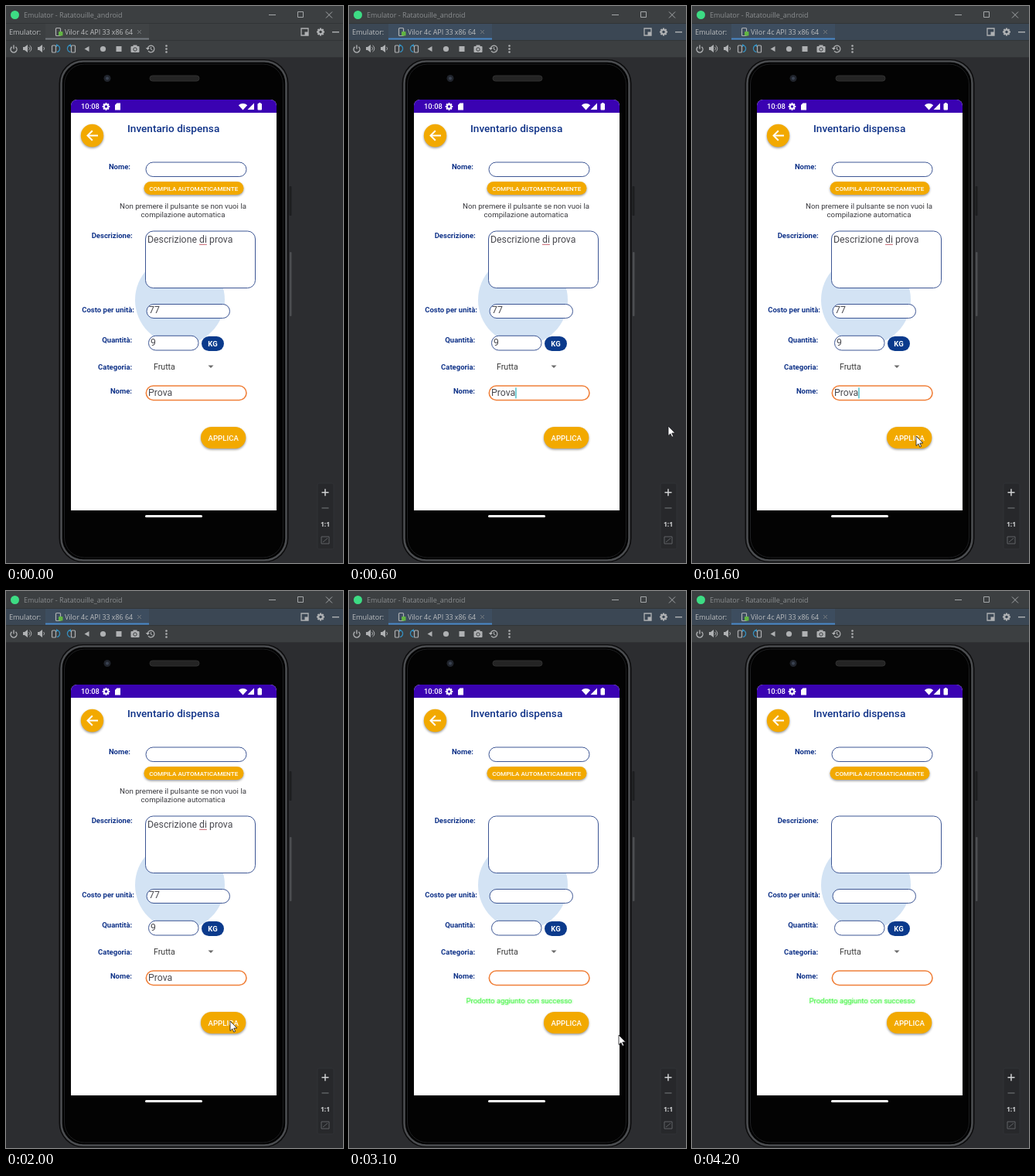
An HTML page with a canvas for the animation above (4300 ms loop, 436 by 720 pixels).

```html
<!DOCTYPE html>
<html lang="it">
<head>
<meta charset="utf-8">
<title>Emulator</title>
<style>
html, body { margin: 0; width: 100%; height: 100%; overflow: hidden; background: #2c2d30; }
canvas { display: block; width: 436px; height: 720px; }
</style>
</head>
<body>
<canvas id="stage"></canvas>
<script>
const W = 436, H = 720, LOOP = 4300, STEP = 100;
const FOCUS_AT = 300, SENT_AT = 2200, LEAVE_AT = 4000;
const NAVY = '#0f3288', EDGE = '#3d5694', AMBER = '#f2a900', ICON = '#afb1b3', BAR = '#3c3f41';
const APP = 'Roboto, sans-serif', IDE = '"Open Sans", sans-serif';

const canvas = document.getElementById('stage');
const ctx = canvas.getContext('2d');
const ratio = window.devicePixelRatio || 1;
canvas.width = W * ratio;
canvas.height = H * ratio;

// Pointer tip: time, x, y
const path = [
  [300, 437, 545], [400, 431, 545], [600, 413, 543], [800, 369, 543], [900, 335, 544],
  [1000, 303, 546], [1200, 292, 554], [1300, 290, 556], [2700, 290, 556],
  [2800, 300, 560], [3000, 349, 574], [LEAVE_AT, 349, 574]
];

function rect(x, y, w, h, fill) {
  ctx.fillStyle = fill;
  ctx.fillRect(x, y, w, h);
}

function round(x, y, w, h, r, fill, stroke, width = 1) {
  ctx.beginPath();
  ctx.roundRect(x, y, w, h, r);
  paint(fill, stroke, width);
}

function disc(x, y, r, fill, stroke, width = 1) {
  ctx.beginPath();
  ctx.arc(x, y, r, 0, Math.PI * 2);
  paint(fill, stroke, width);
}

function poly(points, fill, stroke, width = 1, close = true) {
  ctx.beginPath();
  points.forEach(([x, y]) => ctx.lineTo(x, y));
  if (close) ctx.closePath();
  paint(fill, stroke, width);
}

function line(points, stroke, width = 1) {
  poly(points, null, stroke, width, false);
}

function arc(x, y, r, from, to, stroke, width = 1) {
  ctx.beginPath();
  ctx.arc(x, y, r, from, to);
  paint(null, stroke, width);
}

function paint(fill, stroke, width) {
  if (fill) { ctx.fillStyle = fill; ctx.fill(); }
  if (stroke) { ctx.strokeStyle = stroke; ctx.lineWidth = width; ctx.stroke(); }
}

function text(str, x, y, font, color, align = 'left') {
  ctx.font = font;
  ctx.fillStyle = color;
  ctx.textAlign = align;
  ctx.fillText(str, x, y);
}

function shaded(draw) {
  ctx.save();
  ctx.shadowColor = 'rgba(0,0,0,.4)';
  ctx.shadowBlur = 3 * ratio;
  ctx.shadowOffsetY = 1.5 * ratio;
  draw();
  ctx.restore();
}

function cross(x, y, r, color, width) {
  line([[x - r, y - r], [x + r, y + r]], color, width);
  line([[x + r, y - r], [x - r, y + r]], color, width);
}

function gear(x, y, r, color, hole) {
  for (let i = 0; i < 4; i++) {
    const a = i * Math.PI / 4, dx = Math.cos(a) * r, dy = Math.sin(a) * r;
    line([[x - dx, y - dy], [x + dx, y + dy]], color, r * 0.45);
  }
  disc(x, y, r * 0.75, color);
  disc(x, y, r * 0.35, hole);
}

function speaker(x, waves) {
  poly([[x - 5, 53], [x - 3, 53], [x + 1, 50], [x + 1, 60], [x - 3, 57], [x - 5, 57]], ICON);
  for (let i = 0; i < waves; i++) arc(x + 1, 55, 2.5 + i * 2.3, -1, 1, ICON);
}

function rotateIcon(x, dir) {
  round(x - dir * 2 - 2.5, 51, 5, 9, 1, null, ICON, 1.2);
  arc(x + dir * 1, 55, 4.6, dir > 0 ? -1.4 : 1.7, dir > 0 ? 1.4 : 4.5, '#3592c4', 1.2);
  poly([[x + dir, 49], [x + dir * 4, 51], [x + dir, 53]], '#3592c4');
}

function drawHeader(focused) {
  const row = focused ? '#3b4754' : BAR;
  rect(0, 0, W, 67, BAR);
  disc(11.5, 11.5, 5.5, '#3ddc84');
  text('Emulator - Ratatouille_android', 23, 14.5, '9px ' + IDE, '#8b8e90');
  line([[340, 11.5], [349, 11.5]], '#a4a7a9');
  round(377.5, 7.5, 7, 7, 0, null, '#a4a7a9');
  cross(418, 11.5, 4, '#a4a7a9', 1);

  rect(0, 22, W, 22, row);
  rect(0, 22, W, 1, '#323537');
  text('Emulator:', 4, 37, '9.1px ' + IDE, '#bbbdbf');
  rect(51, 23, 134, 20, focused ? '#3d4d5f' : '#404345');
  rect(51, 41.5, 134, 2, focused ? '#4a88c7' : '#747a80');
  round(64.5, 28.5, 6, 10, 1, null, ICON, 1.2);
  round(68, 33, 5.5, 5.5, 1, '#62b543');
  text('Vilor 4c API 33 x86 64', 76, 37, '8.9px ' + IDE, '#bbbdbf');
  cross(172.5, 33.5, 2.3, '#7c8083', 1);
  round(382, 29, 9, 9, 0, null, ICON, 1.3);
  rect(386.5, 33.5, 4.5, 4.5, ICON);
  gear(407, 33.5, 5, ICON, row);
  rect(422, 33, 9, 1.4, ICON);
  rect(0, 44, W, 1, '#323537');

  arc(10, 56, 4, -0.9, 4.04, ICON, 1.4);
  line([[10, 50.5], [10, 55.5]], ICON, 1.4);
  speaker(27, 2);
  speaker(46, 1);
  rotateIcon(64, 1);
  rotateIcon(85, -1);
  poly([[101.5, 55.5], [107.5, 52], [107.5, 59]], ICON);
  disc(125.5, 55.5, 3.6, ICON);
  rect(142.5, 52, 7, 7, ICON);
  round(161.5, 52, 11, 8, 1, ICON);
  rect(164.5, 50.5, 5, 2, ICON);
  disc(167, 56, 2.2, ICON, BAR, 1);
  arc(187.5, 55.5, 4.3, -2.8, 2.5, ICON, 1.3);
  poly([[180.8, 54], [186, 54], [183.4, 57]], ICON);
  line([[187.5, 53], [187.5, 56], [189.5, 57]], ICON);
  for (const y of [51.5, 55.5, 59.5]) disc(207.5, y, 1.3, ICON);
  rect(0, 66, W, 1, '#303234');
}

function drawPhone() {
  rect(0, 67, W, H - 67, '#2c2d30');
  round(366.5, 233, 3, 38, 1, '#1d1e20');
  round(367, 318, 2.5, 83, 1, '#4c4e51');
  round(68.5, 69, 297, 650, 31, '#0c0c0d');
  round(71.5, 71.5, 291, 645, 28.5, '#000', '#4b4d50', 2.6);
  round(75.5, 75, 283, 638, 26, '#030303', '#1e1f21', 1);
  disc(131, 93.5, 4.5, '#20242c');
  disc(131, 93.5, 2, '#3a4352');
  round(186, 90, 64, 7, 3.5, '#242424', '#303030', 1);
  round(180, 658, 74, 3, 1.5, '#fff');

  round(403, 617, 21, 85, 2, '#27282b', '#303236');
  rect(408.5, 628, 9, 1.5, '#d0d2d3');
  rect(412.2, 624.3, 1.5, 9, '#d0d2d3');
  rect(408.5, 648.3, 9, 1.3, '#66696b');
  text('1:1', 413, 673, 'bold 8.5px ' + IDE, '#d0d2d3', 'center');
  round(408, 686, 10, 9, 0, null, '#606366', 1);
  line([[410, 693], [416, 688]], '#606366');
}

function drawStatus() {
  round(84, 121, 266, 531, [8, 8, 0, 0], '#fff');
  round(84, 121, 266, 17, [8, 8, 0, 0], '#3a02b2');
  text('10:08', 97, 133.3, '500 9.4px ' + APP, '#fff');
  gear(129.5, 130, 4.8, '#fff', '#3a02b2');
  poly([[143.5, 125.5], [148, 125.5], [148, 134.5], [141, 134.5], [141, 128]], '#fff');
  ctx.beginPath();
  ctx.moveTo(306.5, 134.5);
  ctx.arc(306.5, 134.5, 8.5, -2.3, -0.84);
  paint('#fff');
  poly([[321, 125.5], [321, 134], [312.5, 134]], '#fff');
  round(325.5, 126, 5.5, 8.5, 1, '#fff');
  rect(327, 125, 2.5, 1.5, '#fff');
}

function field(x, y, w, h, r, color = EDGE, width = 1) {
  round(x, y, w, h, r, '#fff', color, width);
}

function drawForm(sent) {
  const label = 'bold 9.5px ' + APP, value = '12.3px ' + APP, ink = '#4a4a50';
  disc(225, 380, 58, '#d3e3f4');

  shaded(() => disc(111.5, 167.5, 14.7, AMBER));
  line([[119, 167.5], [106, 167.5]], '#fff', 2);
  line([[111.8, 161.2], [105.5, 167.5], [111.8, 173.8]], '#fff', 2);
  text('Inventario dispensa', 157, 163.3, '500 13.6px ' + APP, NAVY);

  const labels = [
    ['Nome:', 161, 211.3], ['Descrizione:', 163.7, 300], ['Costo per unità:', 166, 395.7],
    ['Quantità:', 163.3, 435.3], ['Categoria:', 163.3, 469.7], ['Nome:', 163, 500.5]
  ];
  for (const [str, x, y] of labels) text(str, x, y, label, NAVY, 'right');

  field(181, 202, 130, 18.5, 9.2);
  field(180.5, 291, 142, 73.5, 10);
  field(182, 385.5, 107.5, 18, 9);
  field(184.5, 426.3, 64.5, 18.7, 9.2);
  field(181.3, 491, 129.7, 18.5, 9.2, '#f0803a', 1.6);

  shaded(() => round(178.5, 227, 129, 17, 8.5, AMBER));
  text('COMPILA AUTOMATICAMENTE', 242.7, 239, '500 8.1px ' + APP, '#fff', 'center');
  round(253, 427, 29, 19, 9.5, '#0b3a8c');
  text('KG', 267.5, 440, 'bold 9.5px ' + APP, '#fff', 'center');
  text('Frutta', 191, 470.3, '10.6px ' + APP, '#3a3a3a');
  poly([[261.5, 464.5], [268.5, 464.5], [265, 468]], '#6c6c6c');
  shaded(() => round(252, 544, 58.3, 28, 14, AMBER));
  text('APPLICA', 281.2, 562.4, '500 9.6px ' + APP, '#fff', 'center');

  if (sent) {
    ctx.save();
    ctx.shadowColor = 'rgba(60,230,60,.6)';
    ctx.shadowBlur = 2 * ratio;
    ctx.shadowOffsetX = ratio;
    text('Prodotto aggiunto con successo', 220, 533.3, '9.5px ' + APP, '#50f850', 'center');
    ctx.restore();
    return;
  }
  const help = '9.7px ' + APP;
  text('Non premere il pulsante se non vuoi la', 229, 262, help, '#38383d', 'center');
  text('compilazione automatica', 229, 273.3, help, '#38383d', 'center');
  text('Descrizione di prova', 183, 306, value, ink);
  const from = 183 + ctx.measureText('Descrizione ').width;
  line([[from, 308.3], [from + ctx.measureText('di').width, 308.3]], '#c8606c', 1);
  text('77', 185, 397.4, value, ink);
  text('9', 187, 439.3, value, ink);
  text('Prova', 184, 504.2, value, ink);
}

function drawCaret(t, sent) {
  const on = sent ? (t - SENT_AT) % 1000 < 500 && t < 4200 : t % 1000 >= 500;
  if (on) rect(sent ? 184.3 : 215.3, 493.3, 1.3, 14, '#35b8c4');
}

function drawPointer(t) {
  if (t < FOCUS_AT || t >= LEAVE_AT) return;
  const i = path.findIndex(p => p[0] > t);
  const [t0, x0, y0] = path[i - 1], [t1, x1, y1] = path[i];
  const k = (t - t0) / (t1 - t0);
  ctx.save();
  ctx.translate(x0 + (x1 - x0) * k, y0 + (y1 - y0) * k);
  poly([[0, 0], [0, 12.5], [2.9, 9.9], [4.8, 14.2], [6.7, 13.3], [4.8, 9.2], [8.8, 9]],
    '#fff', '#16161a', 0.8);
  ctx.restore();
}

function frame(now) {
  const t = Math.floor(now % LOOP / STEP) * STEP;
  const sent = t >= SENT_AT;
  ctx.setTransform(ratio, 0, 0, ratio, 0, 0);
  drawHeader(t >= FOCUS_AT);
  drawPhone();
  drawStatus();
  drawForm(sent);
  drawCaret(t, sent);
  drawPointer(t);
}

const start = performance.now();
function tick() {
  frame(performance.now() - start);
  requestAnimationFrame(tick);
}
tick();
</script>
</body>
</html>
```
